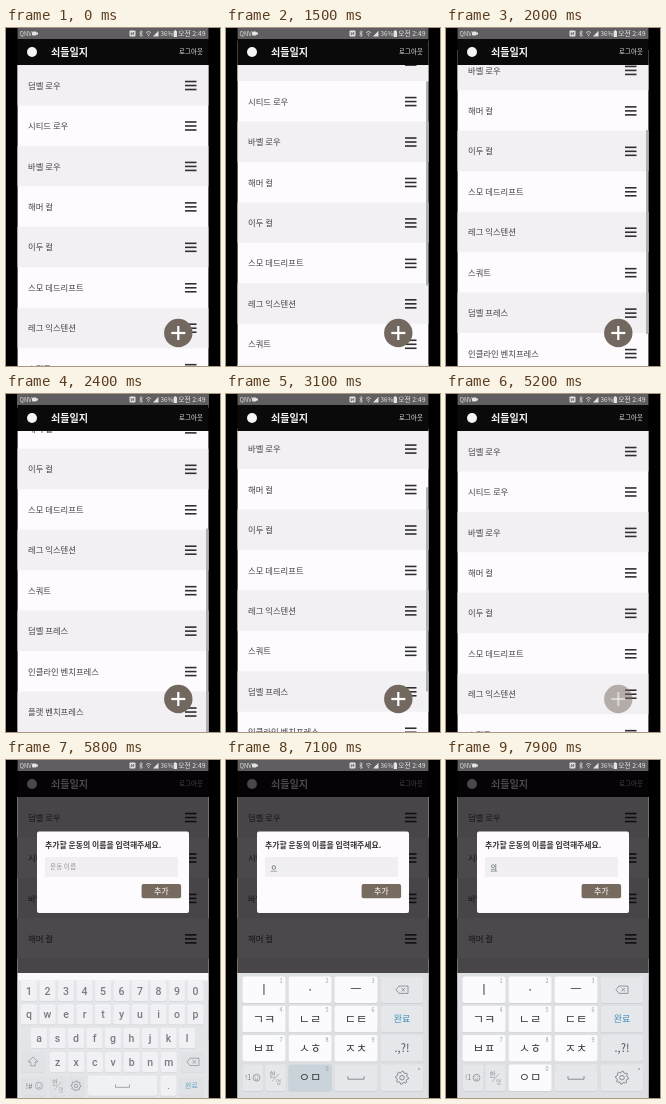
An HTML page with a canvas that plays this animation: 214x338 px, repeating every 8 s.

```html
<!DOCTYPE html>
<html lang="ko">
<head>
<meta charset="utf-8">
<title>운동 목록</title>
<style>
html, body { margin: 0; width: 100%; height: 100%; overflow: hidden; background: #000; }
canvas { display: block; width: 214px; height: 338px; }
</style>
</head>
<body>
<canvas></canvas>
<script>
const W = 214, H = 338, LOOP = 8000, STEP = 100;
const FONT = '"Noto Sans CJK KR", "Noto Sans CJK JP", "Noto Sans CJK", "Noto Sans", sans-serif';
const LEFT = 11.6, RIGHT = 202.4, TOP = 37, VIEW = H - TOP, ROW = 40.45;
const ROWS = ['덤벨 로우', '시티드 로우', '바벨 로우', '해머 컬', '이두 컬', '스모 데드리프트',
  '레그 익스텐션', '스쿼트', '덤벨 프레스', '인클라인 벤치프레스', '플랫 벤치프레스'];
const SCROLL = [[1100, 0], [1200, 3], [1300, 9], [1400, 16], [1500, 24.4], [1700, 51], [2000, 96],
  [2200, 123], [2400, 144], [2700, 144], [2800, 137], [3000, 104], [3300, 42], [3600, 5.5], [3700, 0]];

const canvas = document.querySelector('canvas');
const ctx = canvas.getContext('2d');
const ratio = window.devicePixelRatio || 1;
canvas.width = W * ratio;
canvas.height = H * ratio;

function track(keys, t) {
  if (t <= keys[0][0]) return keys[0][1];
  for (let i = 1; i < keys.length; i++) {
    const [t0, a] = keys[i - 1], [t1, b] = keys[i];
    if (t <= t1) return a + (b - a) * (t - t0) / (t1 - t0);
  }
  return keys[keys.length - 1][1];
}

function box(x, y, w, h, color, radius = 0) {
  ctx.fillStyle = color;
  ctx.beginPath();
  ctx.roundRect(x, y, w, h, radius);
  ctx.fill();
}

function disc(x, y, r, color) {
  ctx.fillStyle = color;
  ctx.beginPath();
  ctx.arc(x, y, r, 0, 7);
  ctx.fill();
}

// y is the optical middle of the glyphs
function text(str, x, y, size, color, align = 'left', weight = 400, font = FONT) {
  ctx.font = `${weight} ${size}px ${font}`;
  ctx.fillStyle = color;
  ctx.textAlign = align;
  ctx.fillText(str, x, y + size * 0.37);
}

function stroke(path, x, y, color, width = 0.9) {
  ctx.save();
  ctx.translate(x, y);
  ctx.strokeStyle = color;
  ctx.lineWidth = width;
  ctx.stroke(new Path2D(path));
  ctx.restore();
}

function statusBar() {
  const c = '#e4e3e4', back = '#605e60';
  box(LEFT, 0, RIGHT - LEFT, 11, back);
  text('QNV', 13.5, 5.6, 6, c);
  box(26, 3.6, 4.5, 4, c, 1);
  box(30, 4.6, 2, 2, c);
  box(123.5, 2.6, 6, 6, c, 1);
  stroke('M-1.2 -1.5V1.5L1.2 -1.5V1.5', 126.5, 5.6, back, 0.8);
  stroke('M-1.6 -1.5L1.5 1.5L0 3V-3L1.5 -1.5L-1.6 1.5', 135, 5.6, c, 0.7);
  stroke('M-2.5 -1Q0 -3.5 2.5 -1M-1.3 .7Q0 -.7 1.3 .7M0 1.5V2.6', 142.5, 5.6, c, 0.8);
  ctx.fillStyle = c;
  ctx.fill(new Path2D('M147 8.5L152.5 8.5V2.8Z'));
  text('36%', 154.5, 5.6, 6.3, c);
  box(167.6, 3, 3.4, 6, c, 0.5);
  box(168.5, 2.2, 1.6, 1, c);
  text('오전 2:49', 199.5, 5.6, 6.8, c, 'right');
}

function header() {
  box(LEFT, 11, RIGHT - LEFT, TOP - 11, '#0b0a0b');
  disc(26, 24, 5, '#f5f5f5');
  text('쇠들일지', 45, 24, 10.1, '#f5f5f5', 'left', 700);
  text('로그아웃', 197, 24, 6.5, '#e6e6e6', 'right', 500);
}

function list(scroll, barAlpha) {
  box(LEFT, TOP, RIGHT - LEFT, VIEW, '#fdfbfe');
  ROWS.forEach((name, i) => {
    const y = TOP + i * ROW - scroll, mid = y + ROW / 2;
    if (i % 2 === 0) box(LEFT, y, RIGHT - LEFT, ROW, '#f2f0f3');
    text(name, 22, mid + 0.3, 8.35, '#454244', 'left', 500);
    for (const d of [-4, 0, 4]) box(179, mid + d - 0.5, 11.5, 1.6, '#302e30');
  });
  ctx.globalAlpha = barAlpha;
  box(200, TOP + scroll * VIEW / (ROWS.length * ROW), 2, 204, '#aaa8ac');
  ctx.globalAlpha = 1;
}

function addButton(alpha) {
  ctx.globalAlpha = alpha;
  disc(172.3, 305, 14.2, '#73685f');
  box(165.3, 303.9, 14, 2.2, '#fff');
  box(171.2, 298, 2.2, 14, '#fff');
  ctx.globalAlpha = 1;
}

function dialog(shift, typed, cursor) {
  ctx.save();
  ctx.translate(0, shift);
  box(31, 71.5, 152, 81.5, '#fdfbfe', 2);
  text('추가할 운동의 이름을 입력해주세요.', 39, 85, 7.87, '#343233', 'left', 700);
  box(39, 97, 133, 20, '#f1eff1', 1);
  if (typed) {
    text(typed, 44.5, 107, 7.2, '#45504d');
    box(44.5, 110.8, 6.6, 0.6, '#66716e');
  } else {
    text('운동 이름', 44, 106.7, 6.7, '#99979a');
  }
  if (cursor) box(44, 102.5, 0.9, 9, '#555');
  box(135.6, 124, 39.5, 14.3, '#776b60', 2);
  text('추가', 155.3, 131.2, 8, '#fff', 'center', 500);
  ctx.restore();
}

const INK = '#50545a', SOFT = '#7d8186', BLUE = '#3f92b8', PANEL = '#dddfe3';

function key(cx, cy, w, h, label, size, { fill = '#fbfbfd', color = INK, font = FONT } = {}) {
  box(cx - w / 2, cy - h / 2 + 0.7, w, h, '#cbced3', 2);
  box(cx - w / 2, cy - h / 2, w, h, fill, 2);
  if (label) text(label, cx, cy, size, color, 'center', 500, font);
}

const GREY = { fill: '#e6e7ea' }, DONE = { fill: '#e6e7ea', color: BLUE };
const LATIN = { font: 'Roboto, sans-serif' };

function backspace(x, y) {
  stroke('M-6 0L-3 -3.7H6V3.7H-3ZM-.5 -1.7L3 1.7M3 -1.7L-.5 1.7', x, y, SOFT, 0.8);
}

function space(x, y, half) {
  stroke(`M${-half} -1.5V1.5H${half}V-1.5`, x, y, SOFT);
}

function gear(x, y, r) {
  let path = '';
  for (let i = 0; i <= 32; i++) {
    const a = i * Math.PI / 16, d = r * (i % 4 < 2 ? 1 : 0.78);
    path += `${i ? 'L' : 'M'}${d * Math.cos(a)} ${d * Math.sin(a)}`;
  }
  stroke(path, x, y, SOFT);
  ctx.strokeStyle = SOFT;
  ctx.lineWidth = 0.9;
  ctx.beginPath();
  ctx.arc(x, y, r * 0.35, 0, 7);
  ctx.stroke();
}

function smile(x, y, r) {
  stroke(`M${r} 0A${r} ${r} 0 1 1 ${-r} 0A${r} ${r} 0 1 1 ${r} 0M${-r / 2} ${r / 4}Q0 ${r} ${r / 2} ${r / 4}`, x, y, SOFT, 0.7);
  for (const d of [-1, 1]) disc(x + d * r * 0.38, y - r * 0.3, 0.45, SOFT);
}

function language(x, y, pressed) {
  text('한', x - 2.5, y - 3, 6.5, pressed ? BLUE : SOFT, 'center');
  text('영', x + 3.5, y + 4, 5.5, '#94989d', 'center');
  stroke('M-3 4L4 -4', x, y, '#94989d', 0.6);
}

function latinKeys(pressed) {
  const row = (chars, x, y) => [...chars].forEach((c, i) => key(x + i * 18.5, y, 16.3, 20, c, 10.5, LATIN));
  row('1234567890', 23, 223.5);
  row('qwertyuiop', 23, 247);
  row('asdfghjkl', 33, 270.7);
  row('zxcvbnm', 51.7, 294.4);
  key(27, 294.4, 24, 20, '', 0, GREY);
  stroke('M0 -5L5 0H2.3V4H-2.3V0H-5Z', 27, 294.4, SOFT, 0.8);
  key(187, 294.4, 24, 20, '', 0, GREY);
  backspace(187, 294.4);
  const y = 318.3;
  key(28, y, 25, 20, '', 0, GREY);
  text('!#', 23, y, 7.5, INK, 'center');
  smile(33, y, 3.6);
  key(51.7, y, 16.3, 20, '', 0, GREY);
  language(51.5, y, pressed === 'lang');
  key(70, y, 16.3, 20, '', 0, GREY);
  gear(70, y, 5);
  key(116.5, y, 69, 20);
  space(116.5, y, 7);
  key(162.5, y, 16.3, 20, '.', 9, LATIN);
  key(185.5, y, 25, 20, '완료', 7, DONE);
}

function hangulKeys(pressed) {
  const labels = ['ㅣ', '·', 'ㅡ', 'ㄱㅋ', 'ㄴㄹ', 'ㄷㅌ', 'ㅂㅍ', 'ㅅㅎ', 'ㅈㅊ'];
  const X = [38, 84.1, 130, 176], Y = [229.7, 259, 288.3, 317.7];
  const letter = (label, digit, x, y) => {
    key(x, y, 43, 26.5, label, 12.3, { fill: pressed === label ? '#c9d3da' : '#fbfbfd', color: '#3f4247' });
    text(digit, x + 17, y - 8.7, 5.5, '#999fa4', 'center');
  };
  labels.forEach((c, i) => letter(c, i + 1, X[i % 3], Y[Math.floor(i / 3)]));
  letter('ㅇㅁ', 0, X[1], Y[3]);
  ['', '완료', '.,?!', ''].forEach((c, i) => key(X[3], Y[i], 43, 26.5, c, i === 1 ? 9 : 11, i === 1 ? DONE : GREY));
  backspace(X[3], Y[0]);
  gear(X[3], Y[3], 6.5);
  disc(X[3] + 17, Y[3] - 8.7, 0.8, SOFT);
  key(27, Y[3], 20.5, 26.5, '', 0, GREY);
  text('!1', 22, Y[3], 7, SOFT, 'center');
  smile(30.5, Y[3], 3.4);
  key(49.5, Y[3], 20.5, 26.5, '', 0, GREY);
  language(49, Y[3], false);
  key(X[2], Y[3], 43, 26.5, '', 0, GREY);
  space(X[2], Y[3], 8);
}

function keyboard(t) {
  const pressed = t >= 6100 && t < 6200 ? 'lang'
    : t >= 7100 && t < 7200 ? 'ㅇㅁ'
    : t >= 7500 && t < 7600 ? 'ㅡ' : '';
  box(LEFT, 213, RIGHT - LEFT, H - 213, '#faf8fa');
  ctx.save();
  ctx.globalAlpha = track([[5800, 0.75], [6000, 1]], t);
  ctx.translate(0, track([[5800, 7.5], [5900, 2], [6000, 0]], t));
  box(LEFT, 213, RIGHT - LEFT, H - 213, PANEL);
  (t < 6200 ? latinKeys : hangulKeys)(pressed);
  ctx.restore();
}

function draw(t) {
  ctx.setTransform(ratio, 0, 0, ratio, 0, 0);
  box(0, 0, W, H, '#000');
  const bar = t < 1200 ? 0 : track([[4400, 0.9], [4600, 0]], t);
  list(track(SCROLL, t), bar);
  addButton(t >= 5200 && t < 5400 ? 0.5 : 1);
  header();
  statusBar();

  const fade = track([[5200, 0], [5400, 1]], t);
  if (fade) {
    box(LEFT, 11, RIGHT - LEFT, H - 11, `rgba(3,0,4,${0.71 * fade})`);
    const typed = t < 7100 ? '' : t < 7300 ? 'ㅇ' : t < 7900 ? '으' : '의';
    ctx.globalAlpha = fade;
    dialog(t < 5800 ? 62 : 0, typed, t >= 5400 && t < 5600);
    ctx.globalAlpha = 1;
  }
  if (t >= 5800) keyboard(t);
}

function tick() {
  const t = performance.now() % LOOP;
  draw(Math.floor(t / STEP) * STEP);
  requestAnimationFrame(tick);
}
tick();
</script>
</body>
</html>
```
